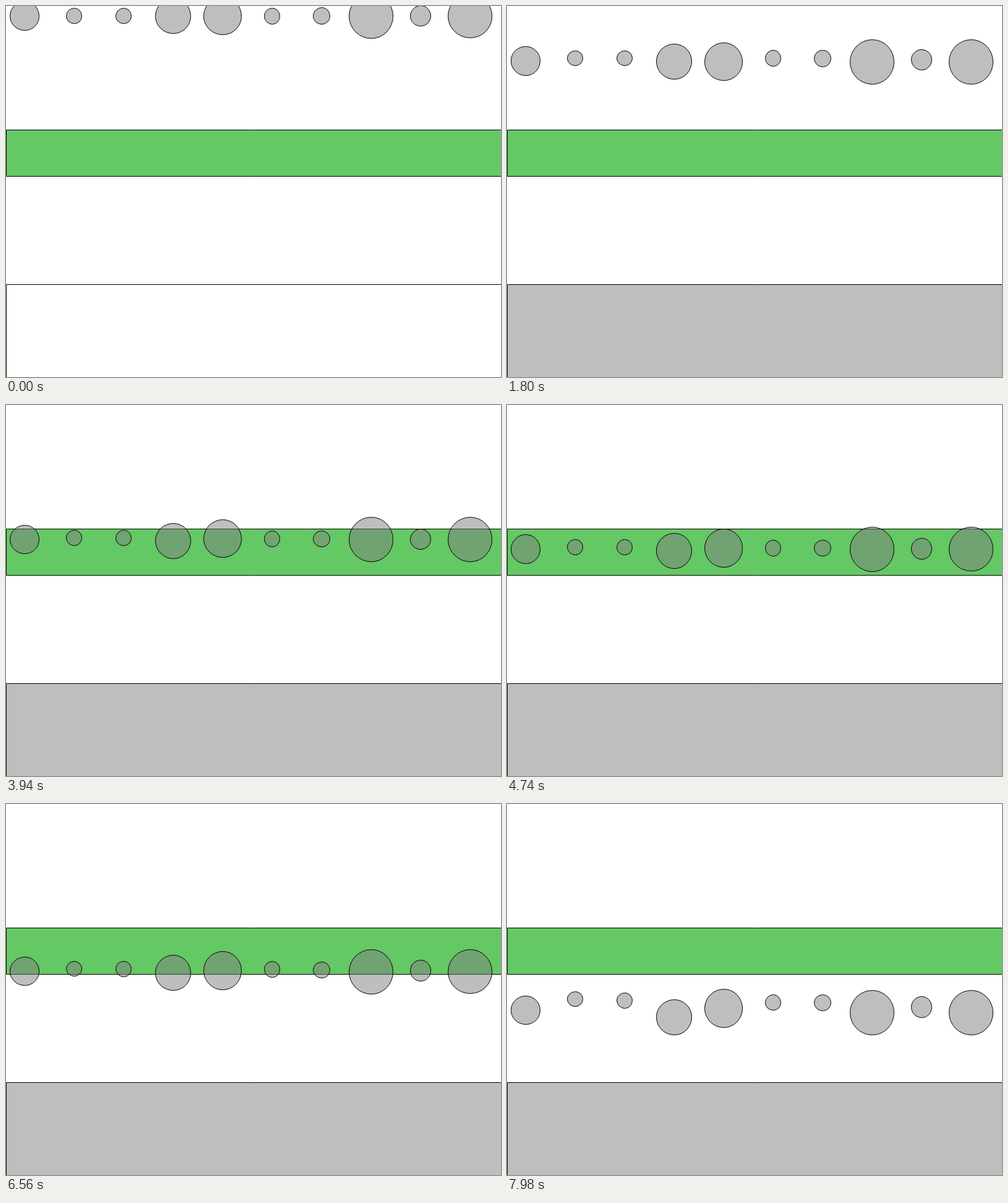
Animation of 800 by 600 pixels, one loop 8000 ms. Source, as an HTML page with a canvas:

```html
<!DOCTYPE html>
<html lang="en">
<head>
<meta charset="utf-8">
<title>Falling balls in liquid</title>
<style>
  html, body { margin: 0; width: 100%; height: 100%; overflow: hidden; background: #fff; }
  canvas { display: block; }
</style>
</head>
<body>
<canvas id="stage" width="800" height="600"></canvas>
<script>
const ctx = document.getElementById('stage').getContext('2d');
const LOOP = 8000;
const GRAVITY = 0.1, FRICTION = 0.02, DRAG = 0.1, SCALE = 16;
const LIQUID = { top: 200, height: 75 };
const GLASS = 'rgba(127, 127, 127, 0.5)';
const diameters = [46.5, 24.5, 24.88, 57, 61.5, 25.85, 26.3, 71.9, 33.5, 71.5];

// Steps come in groups of three, lasting 100, 20 and 20 ms.
function stepAt(ms) {
  if (ms < 20) return 0;
  const u = ms - 20, r = u % 140;
  return 1 + 3 * Math.floor(u / 140) + (r < 100 ? 0 : r < 120 ? 1 : 2);
}

// Height of a ball after a number of physics updates.
function fall(d, updates) {
  const mass = d / SCALE;
  let y = SCALE, v = 0;
  for (let i = 0; i < updates; i++) {
    let acc = GRAVITY;
    if (v > 0) acc -= FRICTION / mass;
    if (y > LIQUID.top - SCALE && y < LIQUID.top + LIQUID.height) acc -= DRAG * v * v;
    v += acc;
    y += v;
  }
  return y;
}

const snap = n => Math.floor(n) + 0.5;

function paint(fill) {
  ctx.fillStyle = fill;
  ctx.fill();
  ctx.stroke();
}

function box(y, h, fill) {
  ctx.beginPath();
  ctx.rect(0.5, y + 0.5, 800, h);
  paint(fill);
}

// Ball whose four extreme points sit on pixel centres.
function ball(x, y, r) {
  const cx = snap(x), cy = snap(y);
  const right = snap(x + r) - cx, left = cx - snap(x - r);
  const down = snap(y + r) - cy, up = cy - snap(y - r);
  const quarters = [[right, down], [left, down], [left, up], [right, up]];
  ctx.beginPath();
  quarters.forEach(([rx, ry], i) =>
    ctx.ellipse(cx, cy, rx, ry, 0, i * Math.PI / 2, (i + 1) * Math.PI / 2));
  ctx.closePath();
  paint(GLASS);
}

function draw(step) {
  ctx.fillStyle = '#fff';
  ctx.fillRect(0, 0, 800, 600);
  ctx.strokeStyle = '#000';
  ctx.lineWidth = 1;
  box(LIQUID.top, LIQUID.height, 'rgb(100, 200, 100)');
  box(450, 150, step ? GLASS : '#fff');
  diameters.forEach((d, i) => ball(30 + 80 * i, fall(d, step + 1), d / 2));
}

const start = performance.now();
function tick() {
  draw(stepAt((performance.now() - start) % LOOP));
  requestAnimationFrame(tick);
}
tick();
</script>
</body>
</html>
```
